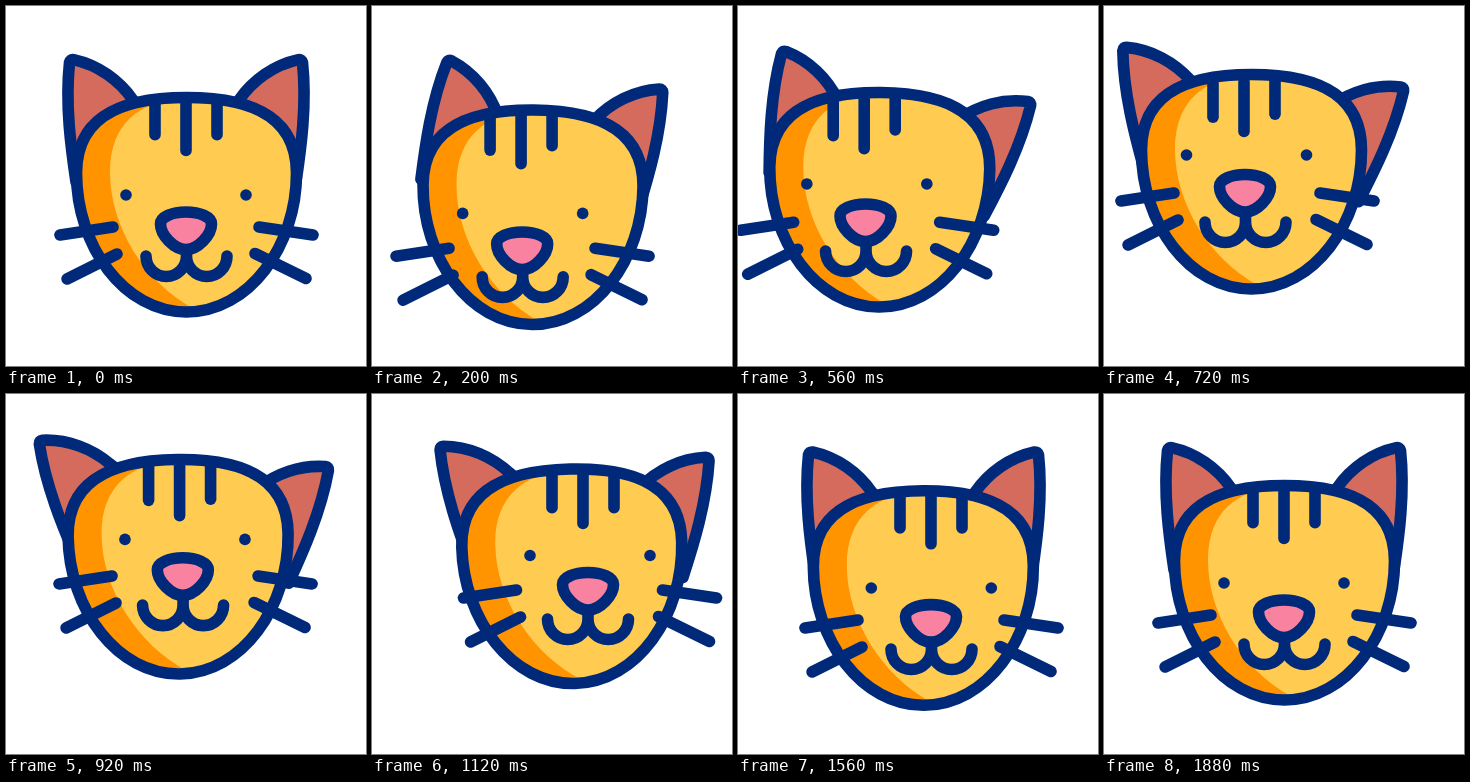
Recreate the animation shown at these times as an HTML page with a canvas. Size 360 by 360 pixels, loop 2 s.

```html
<!DOCTYPE html>
<html lang="en">
<head>
<meta charset="utf-8">
<title>Cat head</title>
<style>
html, body { margin: 0; width: 100%; height: 100%; overflow: hidden; background: #fff; }
canvas { display: block; width: 360px; height: 360px; }
</style>
</head>
<body>
<canvas id="stage" width="360" height="360"></canvas>
<script>
const ctx = document.getElementById('stage').getContext('2d');
const NAVY = '#002a79', YELLOW = '#ffcb50', ORANGE = '#ff9300', EAR = '#d46b5d', PINK = '#fa82a1';
const LOOP = 2000, STEP = 40, LAST = 1880;

// Smooth curve through (times, values), at rest on both ends.
function track(times, values) {
  const n = times.length - 1;
  const slope = values.map((v, i) => {
    if (i === 0 || i === n) return 0;
    const a = times[i] - times[i - 1], b = times[i + 1] - times[i];
    return ((v - values[i - 1]) / a * b + (values[i + 1] - v) / b * a) / (a + b);
  });
  return t => {
    if (t >= times[n]) return values[n];
    let i = 0;
    while (t >= times[i + 1]) i++;
    const d = times[i + 1] - times[i], u = (t - times[i]) / d, w = 1 - u;
    return w * w * (1 + 2 * u) * values[i] + u * w * w * d * slope[i]
      + u * u * (3 - 2 * u) * values[i + 1] - u * u * w * d * slope[i + 1];
  };
}

const headTimes = [0, 180, 310, 360, 560, 720, 920, 1120, 1280, 1400, 1560, 1680, 1880];
const partTimes = [0, 360, 720, 1120, 1280, 1560, 1760];
const part = (...v) => track(partTimes, [0, ...v, 0]);

const head = {
  x: track(headTimes, [0, -17, -36, -40, -39, -33, -8, 20, 27.5, 20, 5, 1, 0]),
  y: track(headTimes, [0, 11, 20, 17.5, -5, -23, -26, -16.5, 8.5, 15, 5.3, 1, 0]),
  turn: part(0.8, 0, -1.3, -1.3, -0.3)
};
// Offsets of the features against the head.
const eyes = { x: part(-17, -4.5, 18, 23.5, 8.3), y: part(8, -17, -11, -2.5, -0.3) };
const stripes = { x: part(-20, -7, 11, 19, 8), y: part(1.5, 4, 1.5, 0.5, 0), tilt: part(-4, -1.5, 0, 0, 0) };
const nose = { x: part(-18, -6, 16, 23, 8), y: part(11, -14.5, -11, -3.5, -0.7) };
const mouth = { x: part(-18, -6, 15.5, 22.5, 8), y: part(13, -11, -8.5, -2, -0.3) };
const whiskers = { x: part(-18, -4, 17.5, 23, 8), y: part(13.5, -11, -8.5, -1.5, -0.3) };
const leftEar = { x: part(53, -12, -16, 2, 2), y: part(-19.5, 11, 15.5, -0.5, -1), turn: part(26, -7, -12, 0, 0) };
const rightEar = { x: part(29, 37, 21, -3.5, -1), y: part(35.5, 51, 26.5, -1.5, -1), turn: part(17, 19, 9.5, 0, 0) };

const earShape = new Path2D('M-1.5 2.5Q-0.8 -0.8 2.5 -0.3C27 5 48 20 62 40L85 70L5 122C0 88 -6 45 -1.5 2.5Z');
const headShape = new Path2D('M180.5 91.5C230 91.5 290.5 102 290.5 167C290.5 240 243 306 180.5 306' +
  'C118 306 70.5 240 70.5 167C70.5 102 131 91.5 180.5 91.5Z');
const shade = new Path2D('M170 94C136 96 104 116 104 166C104 220 138 276 188 303L180 320L40 320L40 80Z');
const noseShape = new Path2D('M180 206C194 206 205.5 211 205.5 218C205.5 229 192 243.5 180 243.5' +
  'C168 243.5 154.5 229 154.5 218C154.5 211 166 206 180 206Z');
const mouthShape = new Path2D('M180.5 243V250M140 250A20.25 20.5 0 0 0 180.5 250A20.25 20.5 0 0 0 221 250');
const whiskerShape = new Path2D('M54 229L107 221M61 273L111 248M253 221L307 229M249 247.5L300 272.5');

function at(pos, t, draw) {
  ctx.save();
  ctx.translate(pos.x(t), pos.y(t));
  draw();
  ctx.restore();
}

function rotate(degrees) {
  ctx.rotate(degrees * Math.PI / 180);
}

function fill(shape, color) {
  ctx.fillStyle = color;
  ctx.fill(shape);
}

function ear(pose, tipX, flip, t) {
  at(pose, t, () => {
    ctx.translate(tipX, 54);
    rotate(pose.turn(t));
    ctx.scale(flip, 1);
    fill(earShape, EAR);
    ctx.stroke(earShape);
  });
}

function drawSkull(t) {
  ctx.save();
  ctx.translate(180.5, 199);
  rotate(head.turn(t));
  ctx.translate(-180.5, -199);
  fill(headShape, YELLOW);
  ctx.save();
  ctx.clip(headShape);
  fill(shade, ORANGE);
  ctx.restore();
  ctx.stroke(headShape);
  ctx.restore();
}

function drawStripes(t) {
  for (const side of [-1, 0, 1]) {
    const x = 180 + side * 31, dy = side * stripes.tilt(t);
    ctx.beginPath();
    ctx.moveTo(x, 95 + dy);
    ctx.lineTo(x, (side ? 128.7 : 144.5) + dy);
    ctx.stroke();
  }
}

function drawEyes() {
  ctx.fillStyle = NAVY;
  for (const x of [120, 240]) {
    ctx.beginPath();
    ctx.arc(x, 189, 5.8, 0, Math.PI * 2);
    ctx.fill();
  }
}

function drawCat(t) {
  ear(leftEar, 65, 1, t);
  ear(rightEar, 295, -1, t);
  drawSkull(t);
  at(stripes, t, () => drawStripes(t));
  at(eyes, t, drawEyes);
  at(mouth, t, () => ctx.stroke(mouthShape));
  at(nose, t, () => {
    fill(noseShape, PINK);
    ctx.stroke(noseShape);
  });
  at(whiskers, t, () => ctx.stroke(whiskerShape));
}

const start = performance.now();

function frame() {
  const now = Math.max(0, performance.now() - start) % LOOP;
  const t = Math.min(LAST, Math.floor(now / STEP) * STEP);
  ctx.fillStyle = '#fff';
  ctx.fillRect(0, 0, 360, 360);
  ctx.strokeStyle = NAVY;
  ctx.lineWidth = 11.6;
  ctx.lineCap = ctx.lineJoin = 'round';
  at(head, t, () => drawCat(t));
  requestAnimationFrame(frame);
}
frame();
</script>
</body>
</html>
```
